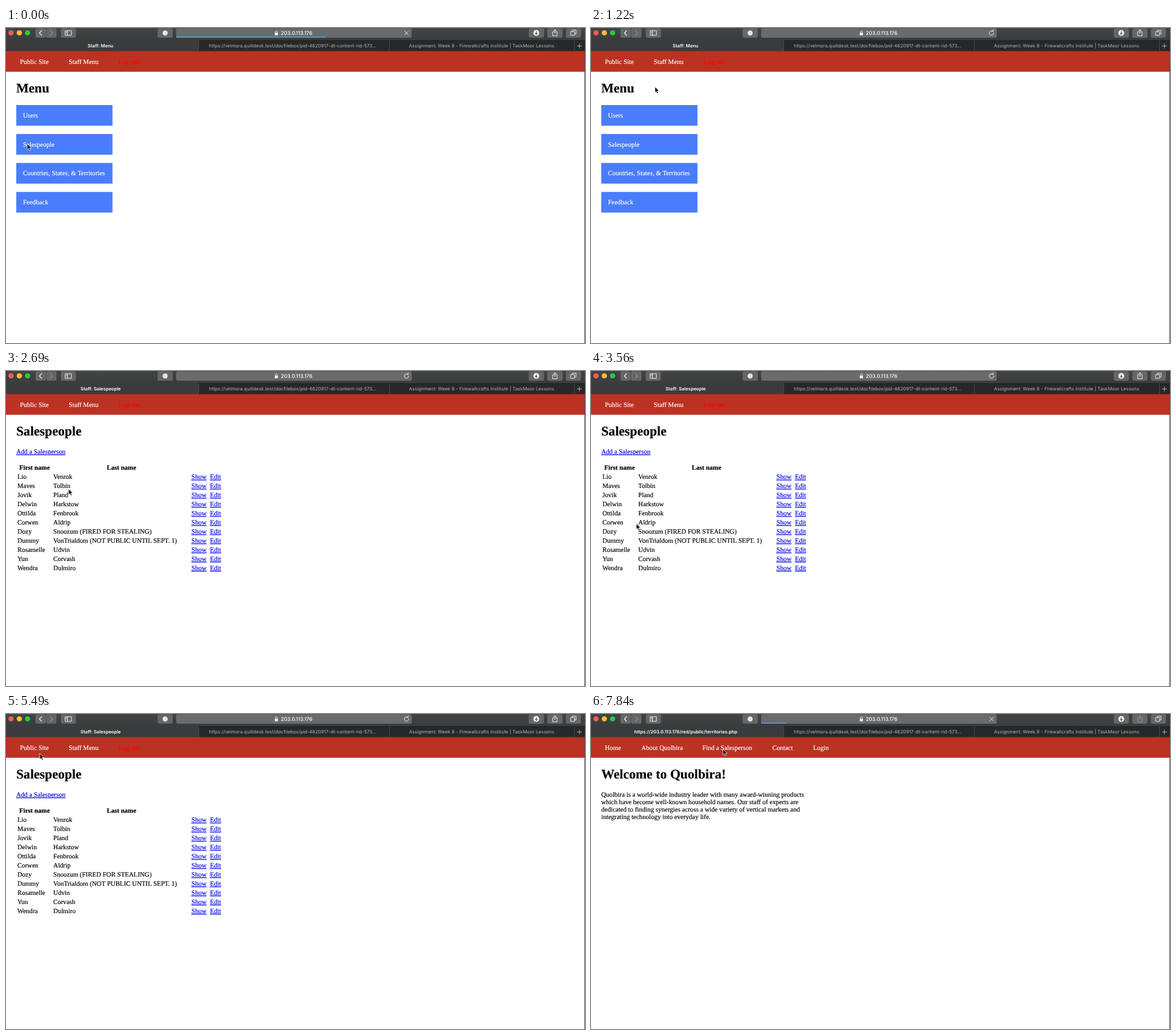
Recreate the animation shown at these times as an HTML page. Size 1014 by 552 pixels, loop 7.99 s.

```html
<!DOCTYPE html>
<html lang="en">
<head>
<meta charset="utf-8">
<title>Staff pages</title>
<style>
  html, body { margin: 0; width: 100%; height: 100%; overflow: hidden; background: #fff; }
  svg { display: block; width: 100vw; height: 100vh; }
  text { text-rendering: geometricPrecision; white-space: pre; }

  .ui { font-family: Inter, "Open Sans", sans-serif; font-size: 8.1px; letter-spacing: .07px; text-anchor: middle; fill: #b3b4b5; }
  .ui .title { font-size: 8px; font-weight: 600; letter-spacing: 0; fill: #fff; }
  .ui .address { font-size: 8.9px; font-weight: 500; letter-spacing: 0; fill: #fff; }
  .page { font-family: "Liberation Serif", "Times New Roman", serif; font-size: 11.56px; color: #000; }
  .page text, .page tspan { fill: currentColor; stroke: currentColor; stroke-width: .18; }
  .head { font-size: 23.12px; font-weight: bold; }
  .th { font-weight: bold; text-anchor: middle; }
  .link { color: #0000ee; text-decoration: underline; }
  .nav { color: #fff; }
  .out { color: #f00; }
  .btn { fill: #4a7dfb; }
  .key { fill: #656667; }
  .line { fill: none; stroke: #f1f1f1; stroke-width: 1; stroke-linecap: round; stroke-linejoin: round; }

  /* every track shares one 7990 ms clock */
  .run { animation: 7990ms step-end infinite; }
  .menu { animation-name: menu; }
  .sales { animation-name: sales; }
  .home { animation-name: home; }
  .index { animation-name: index; }
  .terr { animation-name: terr; }
  .busy { animation-name: busy; }
  .idle { animation-name: idle; }
  .lock { animation-name: lock; }
  .addr { animation-name: addr; }
  .share { animation-name: share; }
  .bar { animation-name: bar; fill: #3ba7df; }
  .users { animation-name: users; }
  .people { animation-name: people; }
  .cursor { animation-name: cursor; }

  @keyframes menu { 0% { opacity: 1 } 31.79%, 100% { opacity: 0 } }
  @keyframes sales { 0%, 81.665%, 100% { opacity: 0 } 31.79% { opacity: 1 } }
  @keyframes home { 0% { opacity: 0 } 81.665%, 100% { opacity: 1 } }
  @keyframes index { 0%, 98.06%, 100% { opacity: 0 } 81.665% { opacity: 1 } }
  @keyframes terr { 0% { opacity: 0 } 98.06%, 100% { opacity: 1 } }
  @keyframes busy {
    0%, 26.22%, 79.787%, 96.308%, 100% { opacity: 1 }
    5.632%, 33.605%, 85.357% { opacity: 0 }
  }
  @keyframes idle {
    0%, 26.22%, 79.787%, 96.308%, 100% { opacity: 0 }
    5.632%, 33.605%, 85.357% { opacity: 1 }
  }
  @keyframes lock {
    0%, 28.035%, 81.665%, 98.06%, 100% { opacity: 1 }
    26.22%, 79.787%, 96.308% { opacity: 0 }
  }
  @keyframes addr {
    0%, 28.035%, 81.665%, 98.06%, 100% { transform: none }
    26.22%, 79.787%, 96.308% { transform: translateX(-3.5px) }
  }
  @keyframes share {
    0%, 33.605%, 85.357% { opacity: 1 }
    26.22%, 79.787%, 96.308%, 100% { opacity: .35 }
  }
  @keyframes bar {
    0% { width: 262px } 1.877% { width: 330px } 3.755% { width: 412px } 5.632% { width: 0 }
    26.22% { width: 14px } 28.035% { width: 60px } 29.912% { width: 110px }
    31.79% { width: 262px } 33.605% { width: 0 }
    79.787% { width: 14px } 81.665% { width: 156px } 83.479% { width: 300px } 85.357% { width: 0 }
    96.308% { width: 14px } 98.06%, 100% { width: 44px }
  }
  @keyframes users {
    0%, 7.76%, 18.917%, 100% { fill: #4a7dfb }
    3.83%, 17.06% { fill: #3d6fe0 }
  }
  @keyframes people {
    0%, 3.83%, 20.776% { fill: #4a7dfb }
    1.877%, 18.917%, 22.528%, 100% { fill: #3d6fe0 }
  }
  /* the pointer is sampled about every 147 ms, so each stretch moves in steps */
  @keyframes cursor {
    0% { transform: translate(37px, 203px) }
    1.877% { transform: translate(46px, 196px); animation-timing-function: steps(3) }
    7.76% { transform: translate(113px, 108px) }
    13.392% { transform: translate(112.5px, 104px) }
    15.2% { transform: translate(112px, 103px); animation-timing-function: steps(3) }
    20.776% { transform: translate(110px, 231px) }
    22.528% { transform: translate(109.5px, 206.5px) }
    33.605% { transform: translate(109.5px, 206.5px); animation-timing-function: steps(3) }
    39.174% { transform: translate(92px, 250px); animation-timing-function: steps(3) }
    44.681% { transform: translate(73px, 276px); animation-timing-function: steps(3) }
    50.188% { transform: translate(157px, 168px); animation-timing-function: steps(2) }
    53.75% { transform: translate(133px, 241.5px); animation-timing-function: steps(5) }
    63.079% { transform: translate(72px, 110px); animation-timing-function: steps(3) }
    68.65% { transform: translate(59px, 69px) }
    74.343% { transform: translate(60px, 65px) }
    76.22% { transform: translate(62px, 62px) }
    83.479% { transform: translate(62px, 62px); animation-timing-function: steps(5) }
    92.616%, 100% { transform: translate(231px, 61.5px) }
  }
</style>
</head>
<body>
<svg viewBox="0 0 1014 552" preserveAspectRatio="none">
  <defs>
    <linearGradient id="top" x2="0" y2="1">
      <stop stop-color="#434445"/><stop offset="1" stop-color="#3a3b3c"/>
    </linearGradient>
  </defs>
  <rect width="1014" height="552" fill="#fff"/>

  <!-- browser window -->
  <rect width="1014" height="22" fill="url(#top)"/>
  <rect y="22" width="1014" height="19" fill="#272829"/>
  <rect y="22" width="337" height="19" fill="#3a3b3c"/>
  <path d="M337 22h677" stroke="#1c1d1e"/>
  <path d="M337.5 22v18M671.5 22v18M995.5 22v18" stroke="#4b4c4d"/>
  <circle cx="8.8" cy="8.5" r="4.6" fill="#fc5b57"/>
  <circle cx="23.3" cy="8.5" r="4.6" fill="#fdbd2e"/>
  <circle cx="37.8" cy="8.5" r="4.6" fill="#28c940"/>

  <g class="key">
    <rect x="51.5" y=".5" width="18.5" height="16.5" rx="3"/>
    <rect x="70.5" y=".5" width="18" height="16.5" rx="3"/>
    <rect x="96" y=".5" width="26.5" height="16.5" rx="3"/>
    <rect x="265.5" y=".5" width="26.5" height="16.5" rx="3"/>
    <rect x="298" y=".5" width="412.5" height="16.5" rx="3" fill="#6a6b6c"/>
    <rect x="915.5" y=".5" width="26.5" height="16.5" rx="3"/>
    <rect x="948" y=".5" width="26.5" height="16.5" rx="3"/>
    <rect x="980.5" y=".5" width="26.5" height="16.5" rx="3"/>
  </g>
  <g class="line">
    <path d="M62.3 4.8l-3.8 4 3.8 4" stroke-width="1.3"/>
    <path d="M77.8 4.8l3.8 4-3.8 4" stroke="#8b8c8d" stroke-width="1.3"/>
    <path d="M104 4.8h10.6v8H104zM107.6 4.8v8M105.3 6.8h.9M105.3 8.6h.9"/>
    <path class="run share" d="M959.6 6.7h-2.2v7h7.8v-7H963M961.3 10V3M959 5l2.3-2.2L963.6 5"/>
    <path d="M991.8 5.7V3.8h6.500v6.500h-2M989.3 6.3h6.500v6.500h-6.500z"/>
    <path d="M1000.5 31.5h7.500M1004.25 27.8v7.500" stroke="#b5b6b7"/>
    <path class="run busy" d="M698.2 5.5l6.600 6.600M704.8 5.5l-6.600 6.600"/>
    <path class="run idle" d="M703.8 5.7a3.9 3.9 0 1 0 1.5 3M701.6 5.9h2.700V3.2"/>
  </g>
  <circle cx="278.7" cy="8.7" r="4.5" fill="#e4e4e4"/>
  <circle cx="928.7" cy="8.7" r="5.1" fill="#f4f4f4"/>
  <path d="M928.7 5.7v5M926.5 8.9l2.2 2.3 2.2-2.3" fill="none" stroke="#5b5c5d" stroke-width="1.3"/>
  <g class="run lock">
    <rect x="470.7" y="8.2" width="5.6" height="4.5" rx=".6" fill="#f1f1f1"/>
    <path class="line" d="M471.9 8.2V6.8a1.6 1.8 0 0 1 3.2 0v1.4"/>
  </g>
  <rect class="run bar" x="298" y="15.2" width="262" height="1.8"/>

  <g class="ui">
    <text class="address run addr" x="509" y="12.2">203.0.113.176</text>
    <text class="title run menu" x="165.5" y="34">Staff: Menu</text>
    <text class="title run sales" x="165.8" y="34">Staff: Salespeople</text>
    <text class="title run index" x="165.5" y="34">https://203.0.113.176/red/public/index.php</text>
    <text class="title run terr" x="166" y="34">https://203.0.113.176/red/public/territories.php</text>
    <text x="502" y="34">https://velmora.quilldesk.test/docfilebox/pid-4620917-dt-content-rid-573...</text>
    <text x="833" y="34">Assignment: Week 8 - Firewallcrafts Institute | TaskMoor Lessons</text>
  </g>

  <!-- web pages -->
  <rect y="40.5" width="1014" height="36.2" fill="#bb3223"/>
  <g class="page">
    <g class="run menu">
      <text class="nav" y="63"><tspan x="24.5">Public Site</tspan><tspan x="110">Staff Menu</tspan><tspan x="197.5" class="out">Log out</tspan></text>
      <text class="head" x="18" y="113.2">Menu</text>
      <g class="btn">
        <rect class="run users" x="18" y="135" width="168.5" height="36.2"/>
        <rect class="run people" x="18" y="185.75" width="168.5" height="36.2"/>
        <rect x="18" y="236.5" width="168.5" height="36.2"/>
        <rect x="18" y="287.25" width="168.5" height="36.2"/>
      </g>
      <g class="nav">
        <text x="29.7" y="156.8">Users</text>
        <text x="29.7" y="207.5">Salespeople</text>
        <text x="29.7" y="258.3">Countries, States, &amp; Territories</text>
        <text x="29.7" y="309">Feedback</text>
      </g>
    </g>

    <g class="run sales">
      <text class="nav" y="63"><tspan x="24.5">Public Site</tspan><tspan x="110">Staff Menu</tspan><tspan x="197.5" class="out">Log out</tspan></text>
      <text class="head" x="18" y="113.2">Salespeople</text>
      <text class="link" x="18" y="145.1">Add a Salesperson</text>
      <text class="th" x="50" y="173.3">First name</text>
      <text class="th" x="202.3" y="173.3">Last name</text>
      <g id="rows"></g>
    </g>

    <g class="run home">
      <text class="nav" y="63"><tspan x="24.5">Home</tspan><tspan x="88">About Quolbira</tspan><tspan x="195">Find a Salesperson</tspan><tspan x="317.5">Contact</tspan><tspan x="389">Login</tspan></text>
      <text class="head" x="18" y="113.2">Welcome to Quolbira!</text>
      <text x="18" y="145.1">Quolbira is a world-wide industry leader with many award-winning products</text>
      <text x="18" y="158.1">which have become well-known household names. Our staff of experts are</text>
      <text x="18" y="171.1">dedicated to finding synergies across a wide variety of vertical markets and</text>
      <text x="18" y="184.1">integrating technology into everyday life.</text>
    </g>
  </g>
  <path d="M1013.5 41v511" stroke="#4a4a4b"/>

  <g class="run cursor">
    <path d="M0 0V10.3L2.3 8.2 4 12 5.9 11.2 4.2 7.5H7.4Z" fill="#000" stroke="#fff" stroke-width=".8" stroke-linejoin="round"/>
  </g>
</svg>
<script>
  const people = [
    ["Lio", "Venrok"],
    ["Maves", "Tolbin"],
    ["Jovik", "Pland"],
    ["Delwin", "Harkstow"],
    ["Ottilda", "Fenbrook"],
    ["Corwen", "Aldrip"],
    ["Dozy", "Snoozum (FIRED FOR STEALING)"],
    ["Dummy", "VonTrialdom (NOT PUBLIC UNTIL SEPT. 1)"],
    ["Rosamelle", "Udvin"],
    ["Yun", "Corvash"],
    ["Wendra", "Dulmiro"]
  ];
  const cell = (x, y, text, cls = "") => `<text class="${cls}" x="${x}" y="${y}">${text}</text>`;

  document.getElementById("rows").innerHTML = people.map(([first, last], i) => {
    const y = 189.4 + i * 15.96;
    return cell(20, y, first) + cell(82.8, y, last) +
      cell(324.8, y, "Show", "link") + cell(357.3, y, "Edit", "link");
  }).join("");
</script>
</body>
</html>
```
